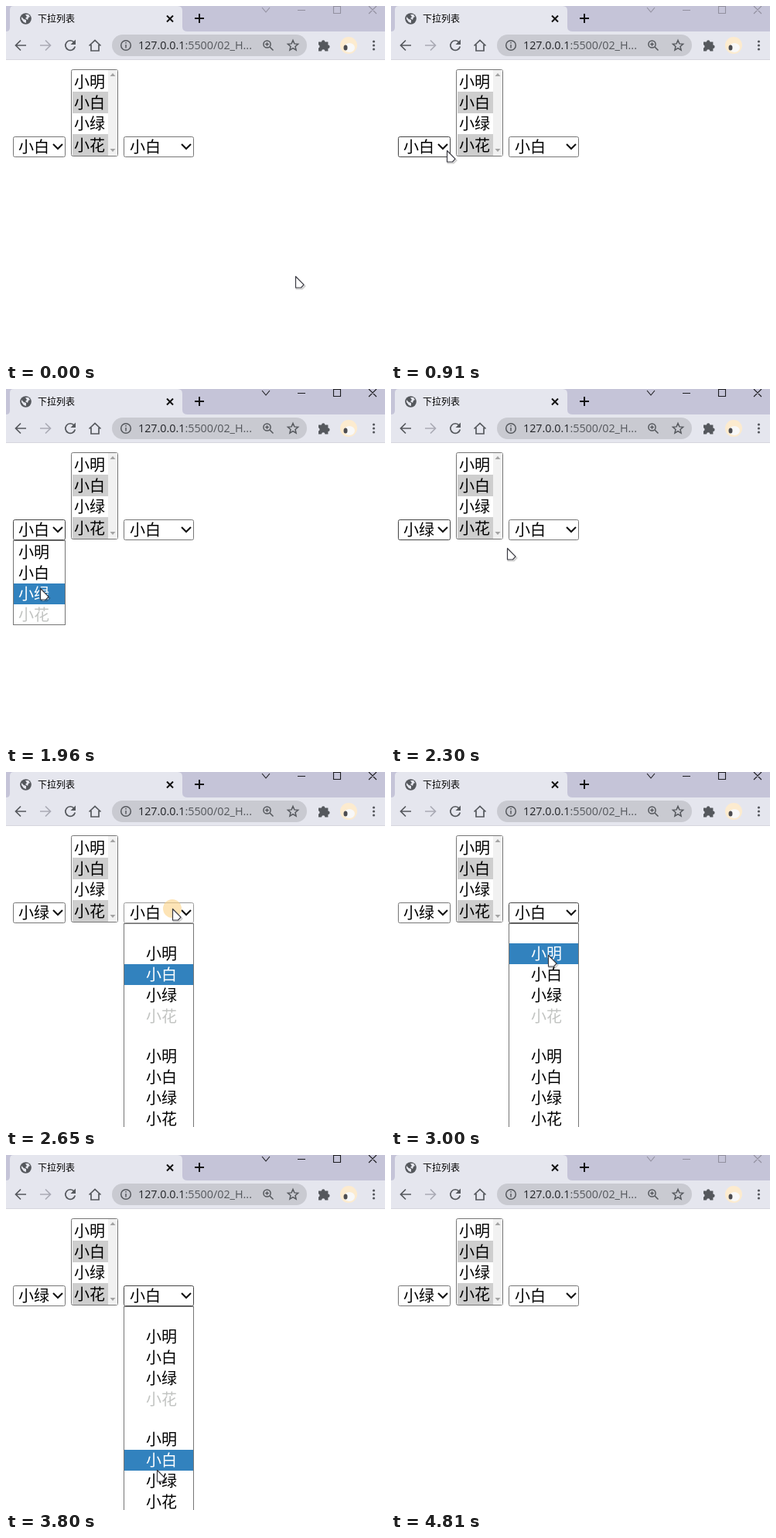
Write an HTML page that moves like this. It is 490 by 460 pixels and loops after 4.87 s.

```html
<!DOCTYPE html>
<html lang="zh-CN">
<head>
<meta charset="utf-8">
<title>下拉列表</title>
<style>
  html, body { margin: 0; height: 100%; overflow: hidden; background: #fff; }
  svg { display: block; width: 100vw; height: 100vh; }
  text { font: 300 20px "Noto Sans CJK SC", "Noto Sans CJK", sans-serif; white-space: pre; }
  .title { font-size: 12px; font-weight: 400; }
  .url { font: 14.3px "Open Sans", "Noto Sans", sans-serif; fill: #54575c; }
  .line { fill: none; stroke: #55585d; stroke-width: 1.7; }
  .tab { fill: none; stroke: #111; stroke-width: 2; }
  .box { fill: #fff; stroke: #767676; }
  .chevron { fill: none; stroke: #111; stroke-width: 2.1; }
</style>
</head>
<body>
<svg viewBox="0 0 490 460">
  <!-- tab strip -->
  <path fill="#c5c4d8" d="M0 0H490V34H0Z"/>
  <path fill="#e5e6ee" d="M0 33Q5 33 5 28V5Q5 0 10 0H222Q228 0 228 6V27Q228 33 235 33H490V69H0Z"/>
  <path fill="#d6d6dd" d="M0 69H490V70H0Z"/>
  <circle cx="25.5" cy="16.5" r="7.3" fill="#55585d"/>
  <path fill="#e5e6ee" d="M20 14l3 3 3 1v4l-3-1-3-4zM25 11h4l2 3-2 1-1 3-3-2 2-2z"/>
  <text class="title" x="41" y="21">下拉列表</text>
  <path class="tab" d="M208 12.5l8 8m0-8l-8 8M244 16h12m-6-6v12"/>
  <path id="controls" fill="none" stroke-width="1.1" d="M331 2l5 6 5-6M377 5.5h10M423.5 .5h9v9h-9zM469 0l10 10m0-10l-10 10"/>

  <!-- toolbar -->
  <path class="line" d="M26 51H13m6-6.5L12.5 51l6.5 6.5"/>
  <path class="line" style="stroke:#aaabb5" d="M44 51h13m-6-6.5l6.5 6.5-6.5 6.5"/>
  <path class="line" d="M88 47a6.3 6.3 0 1 0 1.3 5.5"/>
  <path fill="#55585d" d="M90 43.5v6.5h-6.5z"/>
  <path class="line" d="M107.5 51.5l7.5-7 7.5 7M110 50v8h10v-8"/>
  <rect x="137" y="37" width="252" height="28" rx="14" fill="#c9cad1"/>
  <g class="line" style="stroke-width:1.5">
    <circle cx="155" cy="51" r="6.3"/>
    <path d="M155 50v4.5M155 47v1.6"/>
    <circle cx="337.5" cy="49.5" r="4.6"/>
    <path d="M341 53l4.5 4.500M335.2 49.5h4.6m-2.3-2.3v4.6"/>
    <path d="M371 44.5l1.9 4.400 4.7.4-3.6 3.1 1.1 4.700-4.1-2.5-4.1 2.5 1.1-4.700-3.6-3.1 4.7-.4z"/>
  </g>
  <text class="url" x="171" y="56"><tspan fill="#222428">127.0.0.1</tspan>:5500/02_H...</text>
  <path fill="#55585d" d="M404 46.5h4a2.200 2.200 0 0 1 4.400 0h4v4a2.200 2.200 0 0 1 0 4.400v3.600h-4a2 2 0 0 0-4.400 0h-4v-4a2.200 2.200 0 0 0 0-4.200z"/>
  <circle cx="443" cy="51" r="11" fill="#fcebcf"/>
  <ellipse cx="444" cy="54" rx="7" ry="6" fill="#f8f8f8"/>
  <ellipse cx="439" cy="54" rx="2.5" ry="3.5" fill="#4c4c50"/>
  <g fill="#55585d"><circle cx="475.5" cy="46" r="1.6"/><circle cx="475.5" cy="51" r="1.6"/><circle cx="475.5" cy="56" r="1.6"/></g>

  <!-- list box -->
  <rect class="box" x="84.5" y="82.5" width="60" height="112" rx="2"/>
  <path fill="#cecece" d="M86 111h46v28H86zM86 166h46v28H86z"/>
  <path fill="#f1f1f1" d="M132 83h12v111h-12z"/>
  <path fill="#a3a3a3" d="M134.5 91l3.5-4 3.5 4zM134.5 185l3.5 4 3.5-4z"/>
  <g id="list"></g>

  <!-- drop-downs -->
  <rect id="border1" class="box" x="9.5" y="169.5" width="67" height="26" rx="2"/>
  <text id="value1" x="16" y="189.5"></text>
  <path class="chevron" d="M61 179l6 6 6-6"/>
  <rect id="border2" class="box" x="152.5" y="169.5" width="90" height="26" rx="2"/>
  <text x="160" y="189.5">小白</text>
  <path class="chevron" d="M227 179l6 6 6-6"/>
  <g id="menu1"></g>
  <g id="menu2"></g>

  <circle id="click" r="12" fill="#fbd285" opacity=".6"/>
  <g id="cursor">
    <path d="M1.5 2V16.5H9L12.5 13z" fill="none" stroke="#000" stroke-opacity=".18" stroke-width="2"/>
    <path d="M.5 .5V15H7.5L11 11.2z" fill="#fff" stroke="#3a3a42" stroke-width="1.2" stroke-linejoin="round"/>
  </g>
</svg>
<script>
const LOOP = 4870, ROW = 27;
const names = ['小明', '小白', '小绿', '小花'];
const $ = id => document.getElementById(id);
const set = (id, name, value) => $(id).setAttribute(name, value);
const show = (id, on) => set(id, 'visibility', on ? 'visible' : 'hidden');
const text = (x, centre, label, fill = '#000') =>
  `<text x="${x}" y="${centre + 7.5}" fill="${fill}">${label}</text>`;

$('list').innerHTML = names.map((name, i) => text(88, 98 + i * 27.4, name)).join('');

// Each menu is a list of option groups, given by the top of the first row.
const menus = {
  menu1: { x: 9, width: 68, height: 110, indent: 16, groups: [198], opens: 1100, closes: 2090 },
  menu2: { x: 152, width: 91, height: 300, indent: 181, groups: [222, 355], opens: 2580, closes: 3940 }
};

function drawMenu(id, pointerY) {
  const { x, width, height, indent, groups } = menus[id];
  const rows = groups.flatMap((top, g) => names.map((name, i) =>
    ({ name, top: top + i * ROW, disabled: !g && i === 3 })));
  const active = rows.filter(r => !r.disabled && r.top <= pointerY).pop() || rows[1];
  $(id).innerHTML =
    `<rect class="box" x="${x + .5}" y="196.5" width="${width - 1}" height="${height - 1}"/>` +
    `<rect x="${x + 1}" y="${active.top}" width="${width - 2}" height="${ROW}" fill="#3282be"/>` +
    rows.map(r => text(indent, r.top + 13.5, r.name,
      r === active ? '#fff' : r.disabled ? '#c2c4c2' : '#000')).join('');
}

// Pointer moves: first step time, last step time, steps, end x, end y
const moves = [
  [70, 70, 1, 153, 152], [100, 100, 1, -60, -60],
  [510, 510, 1, 81, 65], [577, 910, 6, 72, 187],
  [1177, 1560, 6, 60, 214], [1710, 1960, 5, 44, 258], [2090, 2160, 2, 131, 222],
  [2240, 2440, 4, 205, 157], [2510, 2510, 1, 215, 177],
  [2790, 3260, 8, 190, 296], [3330, 3450, 3, 191, 352], [3520, 3800, 5, 195, 408],
  [3940, 4130, 4, 375, 476]
];

function pointerAt(t) {
  let x = 374, y = 350;
  for (const [start, end, steps, toX, toY] of moves) {
    if (t < start) break;
    const step = end > start ? Math.floor((t - start) / (end - start) * (steps - 1) + 1e-6) : 0;
    const p = Math.min(1, (step + 1) / steps);
    x += (toX - x) * p;
    y += (toY - y) * p;
  }
  return [Math.round(x), Math.round(y)];
}

function render(t) {
  const during = (from, to) => t >= from && t < to;
  const [x, y] = pointerAt(t);
  set('cursor', 'transform', `translate(${x} ${y})`);
  set('click', 'cx', x);
  set('click', 'cy', y);
  show('click', during(1100, 1177) || during(2025, 2090) || during(2580, 2720) || during(3880, 3940));
  set('controls', 'stroke', during(1100, 4810) ? '#1c1c20' : '#92909f');

  $('value1').textContent = t < 2090 ? '小白' : '小绿';
  $('border1').style.stroke = during(910, 2580) ? '#444' : '#767676';
  $('border2').style.stroke = during(2580, 2720) ? '#999' : during(2510, 4810) ? '#444' : '#767676';
  for (const id in menus) {
    const open = during(menus[id].opens, menus[id].closes);
    show(id, open);
    if (open) drawMenu(id, y);
  }
}

const begin = performance.now();
function tick() {
  render((performance.now() - begin) % LOOP);
  requestAnimationFrame(tick);
}
tick();
</script>
</body>
</html>
```
